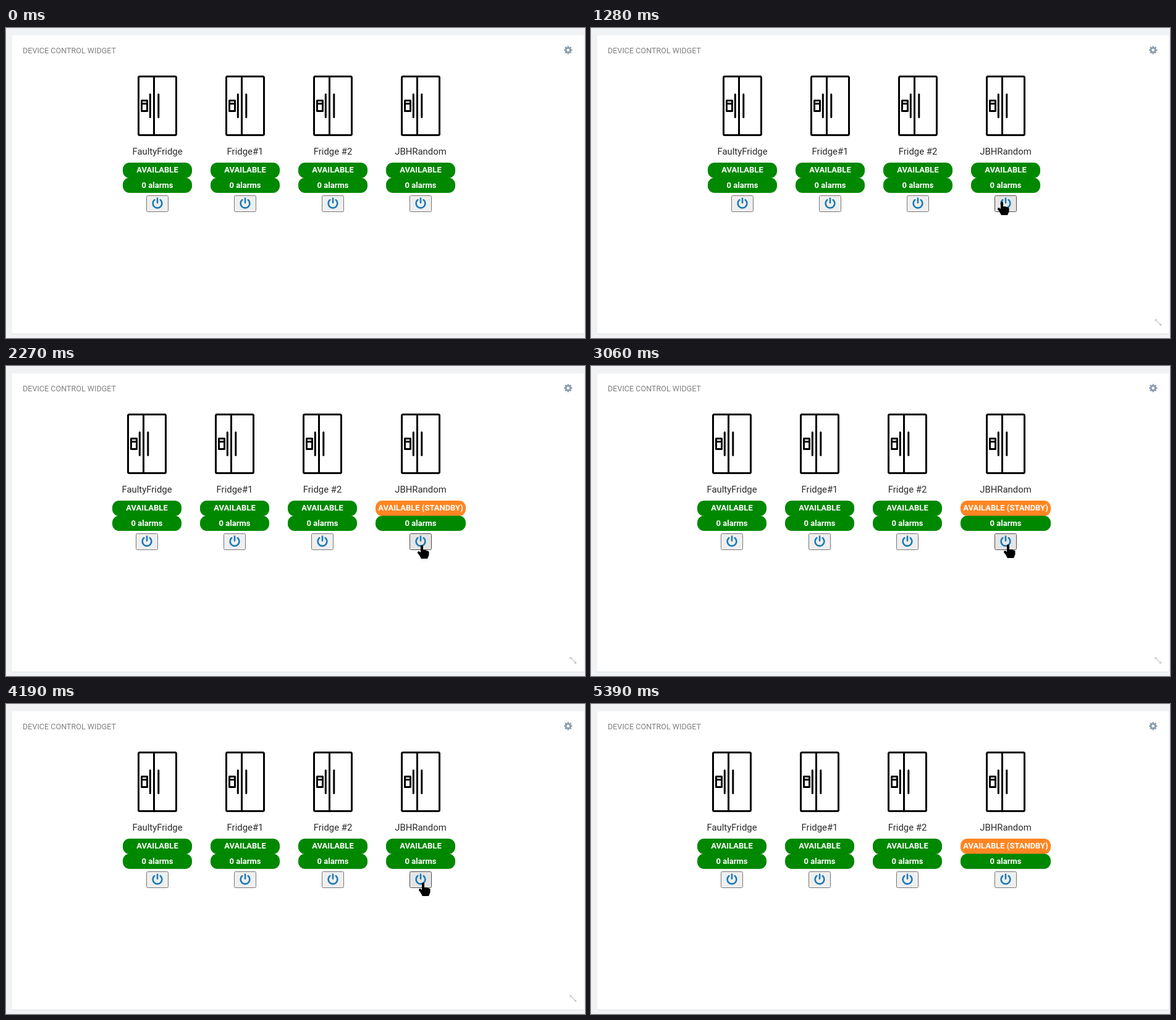
These frames come from a looping animation (937x502 px, 5.52 s). An HTML page:

```html
<!DOCTYPE html>
<html lang="en">
<head>
<meta charset="utf-8">
<title>Device control widget</title>
<style>
  html, body { margin: 0; width: 100%; height: 100%; overflow: hidden; background: #f1f2f4; }
  svg { display: block; }
  text { font-family: Roboto, Arial, sans-serif; }
  .name { font-size: 14.9px; fill: #2a2a2a; text-anchor: middle; }
  .badge { font-size: 13px; font-weight: 700; fill: #fff; text-anchor: middle; }
  .fridge { fill: none; stroke: #000; stroke-width: 3; stroke-linecap: round; stroke-linejoin: round; }
  .power { fill: none; stroke: #1a7ab5; stroke-width: 2.6; stroke-linecap: round; }
  #hand { stroke: #000; stroke-width: 2; stroke-linecap: round; stroke-linejoin: round; }
</style>
</head>
<body>
<svg width="937" height="502" viewBox="0 0 937 502">
  <rect x="10" y="13" width="925" height="483" rx="2" fill="#dcdee0"/>
  <rect x="10" y="12" width="925" height="483" rx="2" fill="#fff"/>
  <text x="27" y="41" font-size="12.6" fill="#808080">DEVICE CONTROL WIDGET</text>
  <g fill="none" stroke="#8a9cae" transform="translate(909.7 35.7)">
    <circle r="3.8" stroke-width="3"/>
    <circle r="5.7" stroke-width="2" pathLength="16" stroke-dasharray="1" stroke-dashoffset=".5"/>
  </g>
  <g id="devices"></g>
  <g id="handle" fill="#c8c8c8">
    <path d="M914 473L921.5 480.5" stroke="#c8c8c8" stroke-width="1.3"/>
    <path d="M912.5 471.5h4l-4 4zM923 482h-4l4-4z"/>
  </g>
  <g id="cursor">
    <path id="arrow" d="M0 0V18L4 14.5L6.5 20H10L8 13.5H13.5Z"/>
    <g id="hand">
      <path d="M-1 2V12" stroke-width="4"/>
      <path d="M-6 12L-2 17" stroke-width="4"/>
      <path d="M-1 9H4L9.5 11V16L7.5 21H-1.5L-4 16Z"/>
    </g>
  </g>
</svg>
<script>
const LOOP = 5520, STEP = 65;
const $ = id => document.getElementById(id);
const names = ["FaultyFridge", "Fridge#1", "Fridge #2", "JBHRandom"];

// The pointer enters, drifts on the button and leaves, each along a curve.
const origin = [880, 495];
const legs = [
  { from: 5, to: 750, bend: [690, 300], end: [666, 281] },
  { from: 1875, to: 2270, bend: [690, 297], end: [674, 290] },
  { from: 2855, to: 2920, bend: [675, 289], end: [676, 289] },
  { from: 4455, to: 4780, bend: [793, 426], end: [894, 501] }
];
const clicks = [{ press: 1150, toggle: 1350 }, { press: 2920, toggle: 3200 }, { press: 3990, toggle: 4260 }];
const HOLD = 130;

const device = name => `<g>
  <g class="fridge">
    <rect x="-30.5" y="78.5" width="61" height="95" rx="2"/>
    <rect x="-25.5" y="117.500" width="9" height="17"/>
    <path d="M-5.500 79V173M-11.700 107.500V144.500M1.800 107.500V144.500M-25 122.500H-17"/>
  </g>
  <text class="name" y="205">${name}</text>
  <rect class="status" y="218" height="25" rx="11"/>
  <rect class="alarms" y="242.500" height="24.500" rx="11" fill="#080"/>
  <text class="badge label" y="234"></text>
  <text class="badge" y="259">0 alarms</text>
  <rect class="button" x="-17.500" y="271.500" width="35" height="26" rx="2"/>
  <path class="power" d="M-4.700 278.300A7.400 7.400 0 1 0 4.700 278.300M0 275.800V283"/>
</g>`;

$("devices").innerHTML = names.map(device).join("");
const groups = [...$("devices").children];

const set = (el, attrs) => {
  for (const key in attrs) el.setAttribute(key, attrs[key]);
};

function pointer(t) {
  let at = origin;
  for (const { from, to, bend, end } of legs) {
    if (t < from) break;
    const stepped = Math.floor((t - from) / STEP) * STEP;
    const p = t >= to ? 1 : stepped / (to - from), q = 1 - p;
    at = at.map((a, i) => q * q * a + 2 * q * p * bend[i] + p * p * end[i]);
  }
  return at;
}

function drawDevice(g, i, standby, hover, pressed) {
  const part = c => g.querySelector("." + c);
  const last = i === names.length - 1, waiting = last && standby;
  const width = waiting ? 146 : 112;
  set(g, { transform: `translate(${245 + 142 * i - (standby && !last ? 17 : 0)} 0)` });
  set(part("status"), { x: -width / 2, width, fill: waiting ? "#ff8522" : "#080" });
  set(part("alarms"), { x: -width / 2, width });
  part("label").textContent = waiting ? "AVAILABLE (STANDBY)" : "AVAILABLE";
  const [fill, stroke] = !last || !hover ? ["#efefef", "#767676"]
    : pressed ? ["#f5f5f5", "#8d8d8d"] : ["#e5e5e5", "#4f4f4f"];
  set(part("button"), { fill, stroke });
}

function draw(t) {
  const standby = clicks.filter(c => c.toggle <= t).length % 2 === 1;
  const pressed = clicks.some(c => t >= c.press && t < c.press + HOLD);
  const [x, y] = pointer(t);
  const hover = x >= 653 && x < 689 && y >= 271 && y < 298;

  groups.forEach((g, i) => drawDevice(g, i, standby, hover, pressed));

  set($("cursor"), {
    transform: `translate(${Math.round(x)} ${Math.round(y)})`,
    visibility: t >= 70 && t < 5390 ? "visible" : "hidden"
  });
  set($("arrow"), { display: hover ? "none" : "inline" });
  set($("hand"), { display: hover ? "inline" : "none" });
  set($("handle"), { opacity: t < 70 || t >= 5070 ? 0 : t < 140 || t >= 4930 ? 0.5 : 1 });
}

const start = performance.now();
function tick() {
  draw((performance.now() - start) % LOOP);
  requestAnimationFrame(tick);
}
tick();
</script>
</body>
</html>
```
